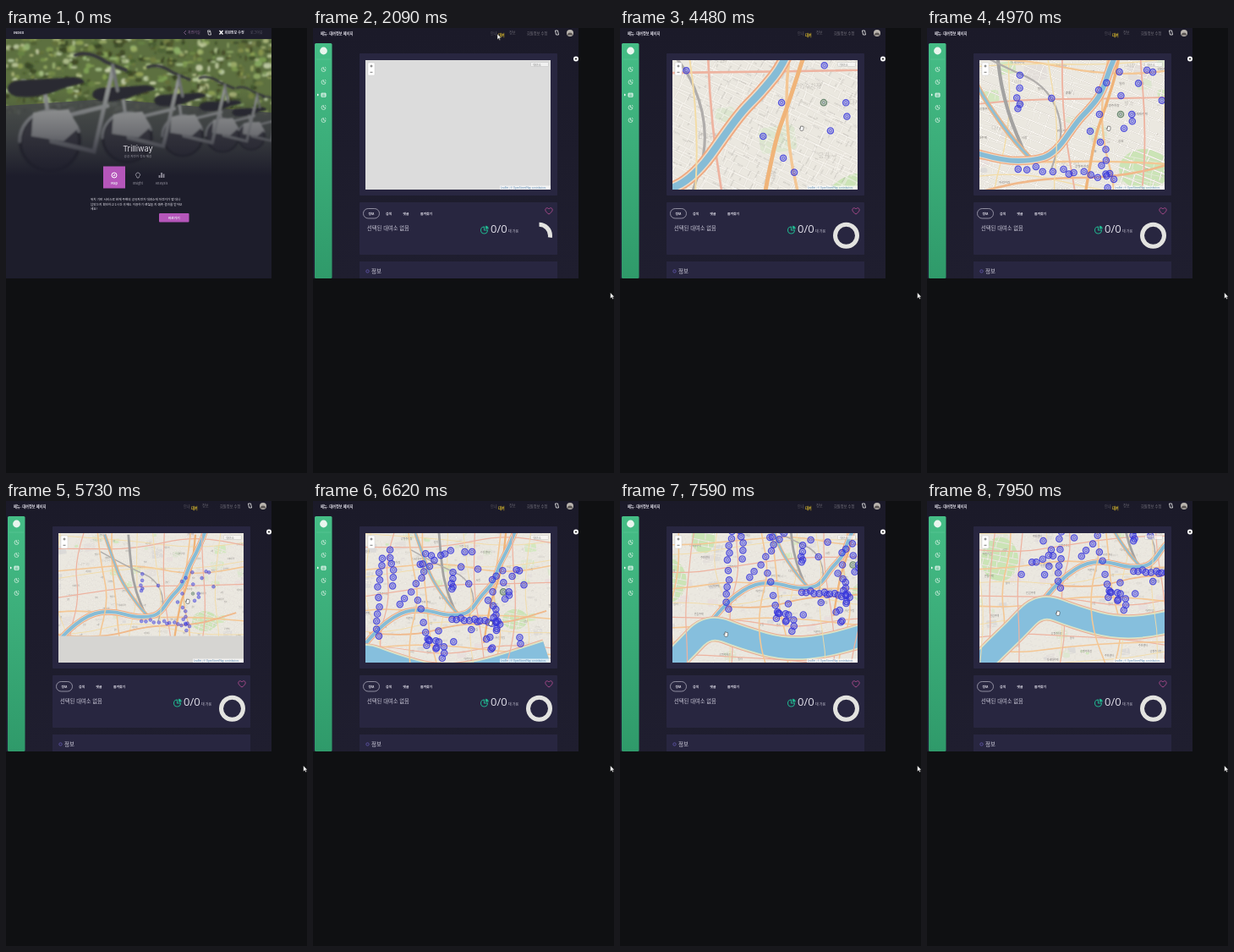
These frames come from a looping animation (356x526 px, 8000 ms). An HTML page:

```html
<!DOCTYPE html>
<html lang="ko">
<head>
<meta charset="utf-8">
<title>Bike map</title>
<style>
html,body{margin:0;width:100%;height:100%;overflow:hidden;background:#0f1012}
svg{display:block;width:356px;height:526px}
text{font-family:'Noto Sans CJK KR','Noto Sans',sans-serif;fill:#e6e4ee}
.mid{text-anchor:middle}
</style>
</head>
<body>
<svg viewBox="0 0 356 526">
  <defs>
    <linearGradient id="fade" x1="0" y1="0" x2="0" y2="1">
      <stop offset="0" stop-color="#1d1d2b" stop-opacity="0"/>
      <stop offset=".5" stop-color="#1d1d2b" stop-opacity=".4"/>
      <stop offset="1" stop-color="#1d1d2b"/>
    </linearGradient>
    <linearGradient id="side" x1="0" y1="0" x2="0" y2="1">
      <stop offset="0" stop-color="#45bd86"/><stop offset="1" stop-color="#2f9a6a"/>
    </linearGradient>
    <linearGradient id="page" x1="0" y1="0" x2="0" y2="1">
      <stop offset="0" stop-color="#1b1a29"/><stop offset="1" stop-color="#1f1e2f"/>
    </linearGradient>
    <filter id="soft"><feGaussianBlur stdDeviation=".9"/></filter>
    <clipPath id="photoClip"><rect y="13" width="314" height="162"/></clipPath>
    <clipPath id="mapClip"><rect x="62" y="38" width="219" height="153"/></clipPath>
    <path id="arrow" d="M0 0v6.6l1.6-1.4 1 2.3 1-.5-1-2.2h2z"/>
  </defs>
  <rect width="356" height="526" fill="#0f1012"/>

  <g id="landing">
    <rect width="314" height="296" fill="#1d1d2b"/>
    <g clip-path="url(#photoClip)">
      <rect y="13" width="314" height="162" fill="#5d7040"/>
      <g id="leaves" filter="url(#soft)"></g>
      <path d="M0 92L120 84 314 100V175H0z" fill="#4c4e50" opacity=".85"/>
      <g id="bikes" filter="url(#soft)"></g>
      <rect y="75" width="314" height="100" fill="url(#fade)"/>
    </g>
    <rect width="314" height="13" fill="#1d1d2b"/>
    <g font-size="4">
      <text x="9" y="7" font-weight="700">INDEX</text>
      <path d="M213 3l-2.5 2.5L213 8" fill="none" stroke="#8f6a94" stroke-width=".8"/>
      <text x="215" y="7" style="fill:#8f6a94">자전거길</text>
      <path d="M238.500 3h3l1 5h-3zM239.500 4.500h2" fill="none" stroke="#ddd" stroke-width=".8"/>
      <path d="M252.500 3l4 4.500M256.500 3l-4 4.500" stroke="#fff" stroke-width="1.300"/>
      <text x="258.500" y="7" font-weight="700">회원정보 수정</text>
      <text x="289" y="7" style="fill:#5e5c6b">로그아웃</text>
    </g>
    <text class="mid" x="156" y="146" font-size="9.200" style="font-family:Inter,sans-serif;fill:#d8d6dc">Trilliway</text>
    <text class="mid" x="156" y="152.500" font-size="3.600" style="fill:#9c9aa6">공공 자전거 정보 제공</text>
    <rect x="115" y="163.500" width="26" height="26" fill="#b556ba"/>
    <circle cx="128" cy="174" r="3" fill="none" stroke="#fff"/>
    <path d="M126.500 175.500l1-2 2-1-1 2z" fill="#fff"/>
    <g fill="none" stroke="#8d8b98">
      <path d="M154.500 175.500a2.500 2.500 0 1 1 3 0l-.5 1.500h-2z"/>
      <path d="M181.500 177v-3M184 177v-6M186.500 177v-4.500" stroke-width="1.800"/>
    </g>
    <g class="mid" font-size="3.800">
      <text x="128" y="185" font-weight="700">Map</text>
      <text x="156" y="185" style="fill:#9a98a4">Insight</text>
      <text x="184" y="185" style="fill:#9a98a4">Analysis</text>
    </g>
    <g font-size="3.650" font-weight="500">
      <text x="100" y="204.300">위치 기반 서비스로 현재 주변의 공유자전거 대여소에 자전거가 몇 대나</text>
      <text x="100" y="209.800">남았는지 확인하고 1시간 후에도 이용하기 괜찮을 지 예측 결과를 받아보</text>
      <text x="100" y="215.300">세요!</text>
    </g>
    <rect x="181" y="219" width="35.500" height="10.500" rx="1" fill="#b556ba"/>
    <text class="mid" x="198.700" y="225.700" font-size="3.800" font-weight="700">바로가기</text>
  </g>

  <g id="board">
    <rect width="314" height="296" fill="url(#page)"/>
    <g font-size="4.200">
      <text x="9" y="8" font-weight="700">메뉴. 대여정보 페이지</text>
      <text x="210" y="8" style="fill:#55535f">안내</text>
      <text x="219" y="9.500" font-weight="700" style="fill:#d9b92c">대여</text>
      <text x="232" y="7" style="fill:#66646f">정보</text>
      <text x="253" y="8" style="fill:#77757f">회원정보 수정</text>
    </g>
    <path d="M286.500 3h3l1 5h-3z" fill="none" stroke="#ddd" stroke-width=".9"/>
    <circle cx="304" cy="6" r="4" fill="#b9b4ae"/><path d="M301 8.500a3 3 0 0 1 6 0z" fill="#5a5553"/>
    <circle cx="311" cy="36.500" r="3" fill="#fff"/><circle cx="311" cy="36.500" r="1.100" fill="#222"/>
    <rect x="2" y="18" width="20.500" height="278" rx="1.500" fill="url(#side)"/>
    <circle cx="12.500" cy="27" r="4.400" fill="#e9f5ee"/>
    <path d="M4 37h17" stroke="#62c99a" stroke-width=".5"/>
    <g id="icons" fill="none" stroke="#bfe6d2" stroke-width=".9"></g>
    <path d="M5 77.500l2 1.500-2 1.500z" fill="#fff"/>
    <g fill="#282640">
      <rect x="55" y="30" width="234" height="168" rx="1"/>
      <rect x="55" y="206" width="234" height="62" rx="1"/>
      <rect x="55" y="276" width="234" height="20"/>
    </g>
    <g clip-path="url(#mapClip)">
      <rect x="62" y="38" width="219" height="153" fill="#dcdcdc"/>
      <g id="tiles">
        <rect x="62" y="38" width="219" height="153" fill="#ebe8e0"/>
        <g id="land"></g>
        <g id="details"></g>
        <g id="roads" fill="none" stroke-linejoin="round"></g>
        <rect id="gap" x="62" width="219" height="60" fill="#d6d5d2"/>
        <g id="pins"></g>
      </g>
      <g opacity=".6">
        <rect x="257.500" y="40.500" width="21" height="5" rx="1" fill="#fff" stroke="#aaa" stroke-width=".5"/>
        <text x="260" y="44.600" font-size="3.600" style="fill:#555">대여소</text>
      </g>
      <rect x="65" y="41" width="8" height="15" rx="1" fill="#fff" stroke="#ccc" stroke-width=".5"/>
      <path d="M67.500 45h3M69 43.500v3M67.500 52.300h3" stroke="#444" stroke-width=".7"/>
      <rect x="221" y="186.500" width="60" height="4.500" fill="#fff" opacity=".7"/>
      <text x="222" y="190" font-size="2.900" style="fill:#4b7fae">Leaflet | © OpenStreetMap contributors</text>
    </g>
    <rect x="59.500" y="213.500" width="19" height="11.500" rx="5.700" fill="none" stroke="#aaa8b8" stroke-width=".8"/>
    <g class="mid" font-size="3.800" font-weight="700">
      <text x="69" y="220.800">정보</text><text x="89.500" y="220.800">검색</text>
      <text x="110" y="220.800">댓글</text><text x="134" y="220.800">즐겨찾기</text>
    </g>
    <path d="M279 220c-8-5-2.500-9.500 0-6 2.500-3.500 8 1 0 6z" fill="none" stroke="#b24c90" stroke-width=".9"/>
    <text x="64" y="238.500" font-size="6.300" style="fill:#c9c7d6">선택된 대여소 없음</text>
    <path d="M202.500 235a4 4 0 1 0 4 4h-4z" fill="none" stroke="#21b08c" stroke-width="1.100"/>
    <path d="M204 237.500v-3.700a3.700 3.700 0 0 1 3.700 3.700z" fill="#21b08c"/>
    <text x="210" y="242" font-size="13" style="font-family:'Open Sans',sans-serif;fill:#dddbe6">0/0</text>
    <text x="231" y="242" font-size="4" font-weight="500" style="fill:#c9c7d6">대 가용</text>
    <circle id="donut" cx="267.500" cy="245.300" r="13" fill="none" stroke="#e3e3e0" stroke-width="5" pathLength="100" transform="rotate(-90 267.500 245.300)"/>
    <circle cx="64.500" cy="287.500" r="1.700" fill="none" stroke="#6459b0" stroke-width=".8"/>
    <text x="69" y="290" font-size="6.500" style="fill:#d5d3e0">정보</text>
  </g>
  <use id="mouse" href="#arrow" fill="#fff" stroke="#222" stroke-width=".5"/>
  <path id="hand" d="M-1.500-2.500c0-1 1.200-1 1.200 0 .2-.7 1.200-.6 1.200.2.400-.5 1.300-.3 1.200.6L1.900 1 1.300 2.300h-2.600L-2.800-.3c0-.6.800-.6 1.300.1z" fill="#fff" stroke="#222" stroke-width=".5"/>
  <use id="outer" href="#arrow" fill="#fff" stroke="#333" stroke-width=".3"/>
</svg>
<script>
const $ = id => document.getElementById(id);
const clamp = (v, a = 0, b = 1) => Math.min(b, Math.max(a, v));
const prog = (t, a, b) => clamp((t - a) / (b - a));
const mix = (a, b, p) => a + (b - a) * p;
const easeOut = p => 1 - (1 - p) ** 3;
const easeIO = p => p * p * (3 - 2 * p);
const range = n => [...Array(n).keys()];

function add(parent, tag, attrs, text) {
  const el = document.createElementNS('http://www.w3.org/2000/svg', tag);
  for (const k in attrs) el.setAttribute(k, attrs[k]);
  if (text) el.textContent = text;
  parent.appendChild(el);
  return el;
}
function rng(seed) {
  return () => (seed = (seed * 16807) % 2147483647) / 2147483647;
}

// Landing photo: sunlit leaves and a row of bikes
const rnd = rng(77);
for (let i = 0; i < 650; i++) {
  const y = 10 + rnd() * 90, light = 18 + rnd() ** 1.4 * 62;
  add($('leaves'), 'ellipse', {
    cx: rnd() * 314, cy: y, rx: 1 + rnd() * 4, ry: 1 + rnd() * 3,
    fill: `hsl(${68 + rnd() * 22} 32% ${light}%)`, opacity: .8
  });
}
function bike(x, y, k) {
  const g = add($('bikes'), 'g', { transform: `translate(${x} ${y}) scale(${k})` });
  const line = (d, stroke, w) => add(g, 'path', { d, stroke, 'stroke-width': w, fill: 'none', 'stroke-linecap': 'round' });
  add(g, 'circle', { cx: 6, cy: 62, r: 35, fill: '#3f4144', stroke: '#2a2b2e', 'stroke-width': 4 });
  line('M-30 62a36 36 0 0 1 70-12', '#8d9090', 4);
  line('M0 4L8 62 58 74 80-22M8 36L74 20', '#8f9291', 5);
  add(g, 'path', { d: 'M-14 28L28 24 40 46 22 62-16 56z', fill: '#a3a5a3' });
  line('M36-40q16-6 36 8l24 10', '#34363a', 4);
  line('M80-28l6 30', '#6f7274', 4);
  add(g, 'path', { d: 'M-44-2q2-9 26-9 26-1 52-3 14 2 12 7-20 4-36 11-24 8-44 5-12-4-10-11z', fill: '#2a2c30' });
}
for (let i = 4; i >= 0; i--) bike(46 + 330 * (1 - .72 ** i), 72 + i * 7, .82 ** i);

range(5).forEach(i => {
  const y = 49 + i * 15;
  add($('icons'), 'path', i == 2
    ? { d: `M10 ${y - 1.800}h5v4h-5zM10 ${y}h5`, stroke: '#fff' }
    : { d: `M12.500 ${y - 2.500}a2.500 2.500 0 1 0 2.500 2.500h-2.500zM14 ${y - 3}l1.500 1.500` });
});

// Map views: screen = world * s + (x, y)
const zoomAt = (v, k, cx, cy) => ({ s: v.s * k, x: cx + (v.x - cx) * k, y: cy + (v.y - cy) * k });
const wide = { s: 1, x: -38, y: 20 };
const town = zoomAt(wide, 2, 213, 117);
const block = zoomAt(town, 2, 217, 116);
const street = zoomAt(block, 2, 217, 116);
const east = { s: 1, x: 0, y: 0 };
const south = { s: 1, x: 46, y: -39 };
const moves = [
  [2770, 3050, street, block, easeOut], [4480, 4760, block, town, easeOut],
  [5510, 5770, town, wide, easeOut], [6550, 6900, wide, east, easeIO], [7380, 7900, east, south, easeIO]
];
function viewAt(t) {
  let v = street;
  for (const [a, b, from, to, ease] of moves) if (t >= a) {
    const p = ease(prog(t, a, b));
    v = { s: mix(from.s, to.s, p), x: mix(from.x, to.x, p), y: mix(from.y, to.y, p) };
  }
  return v;
}
const pinScale = (t, s) => {
  const m = moves.find(([a, b, from, to]) => from.s != to.s && t >= a && t < b + 20);
  return m ? s / m[2].s : 1;
};

// Land patches, roads and water in world units
const r = rng(41);
const tints = ['#d3e8c0', '#e4dfdb', '#dde6d0', '#e9dfdd', '#dcdad8'];
range(110).forEach(i => {
  const size = 3 + r() * 7;
  add($('land'), 'rect', {
    x: r() * 330 - 20, y: r() * 230 + 10, width: size * 1.4, height: size, rx: 1.500,
    fill: tints[i % tints.length], transform: 'rotate(-8)'
  });
});
for (const [cx, cy, rx, ry] of [[273, 122, 15, 12], [40, 108, 22, 26], [82, 58, 14, 18]])
  add($('land'), 'ellipse', { cx, cy, rx, ry, fill: '#cbe4b6' });

const curve = p => {
  let d = 'M' + p[0];
  for (let i = 1; i < p.length - 1; i++)
    d += `Q${p[i]} ${(p[i][0] + p[i + 1][0]) / 2} ${(p[i][1] + p[i + 1][1]) / 2}`;
  return d + 'L' + p[p.length - 1];
};
const roads = [];
function road(pts, ...coats) {
  for (const [stroke, w] of coats) roads.push({ w, el: add($('roads'), 'path', { d: curve(pts), stroke }) });
}
const paints = ['#f3dca6', '#eeb3a0', '#f4c795'];
function arterials(n, upright) {
  range(n).forEach(i => {
    const base = (i + .5) / n, drift = r() * 50 - 25;
    const pts = range(6).map(k => {
      const main = k / 5, side = (r() - .5) * 20 + drift * main;
      return upright ? [base * 330 - 20 + side, main * 240] : [main * 350 - 20, base * 230 + 15 + side];
    });
    road(pts, [paints[i % 3], .9 + i % 3 * .35]);
  });
}
arterials(13, false);
arterials(10, true);
road([[236, 150], [242.7, 106], [249.6, 86.8], [258, 60], [262, 20]], ['#f0b479', 2.300]);
road([[100, 138], [150, 143], [205, 127], [262, 127], [310, 112]], ['#f0b98b', 1.800]);
road([[183, 20], [186, 60], [192, 88], [202, 112]], ['#a3a2a1', 2.800]);
road([[150, 40], [186, 60], [215, 72], [226, 98], [218, 122]], ['#b0adab', 1.500]);
road([[155, 20], [168, 58], [176, 77], [194, 103], [207, 117]], ['#eab488', 4], ['#8fbfd4', 2]);
road([[84, 166], [104, 139], [137, 113], [165, 110], [190, 117], [207, 117], [220, 113], [233.6, 93.2], [240.2, 86.7], [248, 77], [254, 58], [265, 38], [276, 10]],
  ['#efa981', 7.200], ['#f1dcc6', 5.400], ['#86bcd6', 4]);
road([[-10, 262], [22, 226], [58, 192], [88, 160], [129, 176], [179, 190], [233, 185], [310, 160]],
  ['#ecab94', 30], ['#dbe3c6', 28], ['#86bfdd', 24.500]);
arterials(5, true);

// Street grids, one for each zoom level
const words = ['다세대주택', '빌라', '연립주택', '공영주차장', '주민센터', '어린이집', '시장', '공원'];
function grid({ view, level, angle, cx, cy, w, h, step, width, labels, size }) {
  const r = rng(11 + level * 18), el = add($('details'), 'g', {});
  const g = add(el, 'g', { transform: `translate(${cx} ${cy}) rotate(${angle})` });
  let d = '';
  for (let y = -h; y < h; y += step * (.8 + r() * .5)) {
    d += `M${-w} ${y}Q0 ${y + r() * step - step / 2} ${w} ${y}`;
    for (let x = -w; x < w; x += step * (1 + r() * 1.800)) d += `M${x} ${y}l${r() * 3 - 1.500} ${step * 1.050}`;
  }
  add(g, 'path', { d, fill: 'none', stroke: '#cdc7bf', 'stroke-width': width * 1.500 });
  add(g, 'path', { d, fill: 'none', stroke: '#fffdf8', 'stroke-width': width });
  const cols = Math.round(Math.sqrt(labels * 1.400)), rows = Math.ceil(labels / cols);
  range(labels).forEach(i => {
    const x = ((i % cols + r() * .7) / cols * 2 - 1) * w * .9, y = ((Math.floor(i / cols) + r() * .7) / rows * 2 - 1) * h * .9;
    const turn = level == 3 ? (r() < .5 ? -88 : 0) : -angle;
    const label = add(g, 'text', { transform: `translate(${x} ${y}) rotate(${turn})`, 'font-size': size }, words[Math.floor(r() * words.length)]);
    label.style.fill = level == 3 ? '#5b5654' : '#85807e';
  });
  return { el, view, level };
}
const grids = [
  grid({ view: east, level: 0, angle: 12, cx: 150, cy: 135, w: 200, h: 165, step: 7, width: .6, labels: 90, size: 3 }),
  grid({ view: town, level: 1, angle: 22, cx: 180, cy: 115, w: 260, h: 220, step: 10, width: 1, labels: 110, size: 3.600 }),
  grid({ view: street, level: 3, angle: 27, cx: 180, cy: 115, w: 270, h: 240, step: 17, width: 3.200, labels: 340, size: 4.100 })
];

// Bike stations strung along streets or scattered over districts
const pins = [];
function pin(x, y, from, color = '#3434dc') {
  const el = add($('pins'), 'g', {});
  add(el, 'circle', { r: 3.700, fill: color, 'fill-opacity': .3, stroke: color, 'stroke-width': 1.200, 'stroke-opacity': .8 });
  add(el, 'circle', { r: 1.500, fill: '#c9c9f2', 'fill-opacity': .5, stroke: color, 'stroke-width': .6 });
  pins.push({ x, y, from, el });
}
const inCore = (x, y) => x > 232 && x < 262 && y > 85 && y < 108;
function along(n, x0, y0, x1, y1, from = 0) {
  range(n).forEach(i => {
    const p = i / (n - 1);
    pin(mix(x0, x1, p) + r() * 5 - 2.5, mix(y0, y1, p) + r() * 5 - 2.5, from);
  });
}
function scatter(n, x0, y0, x1, y1, from = 0) {
  range(n).forEach(() => {
    const x = mix(x0, x1, r()), y = mix(y0, y1, r());
    if (!inCore(x, y)) pin(x, y, from);
  });
}
const expanded = 5910, panned = 7660;
pin(259, 89.5, 0, '#53775d');
[[246.5, 89.5], [241, 99.5], [247, 106]].forEach(p => pin(...p, 0));
along(13, 200, 122, 256, 127);
along(6, 248, 111, 252, 131);
along(3, 262, 96, 266, 90);
along(5, 197, 68, 200, 88);
scatter(9, 217, 58, 284, 84);
along(11, 114, 48, 110, 143, expanded);
along(6, 126, 42, 128, 80, expanded);
along(9, 136, 104, 185, 45, expanded);
along(5, 157, 100, 172, 147, expanded);
scatter(10, 143, 40, 235, 66, expanded);
scatter(20, 166, 132, 280, 170, expanded);
scatter(10, 64, 80, 105, 128, panned);

// Pointers
const stops = [[970, 262, 135], [1740, 217, 5], [2090, 218, 7], [2560, 234, 60], [2700, 234, 60], [3410, 241, 120], [3480, 241, 120],
  [3620, 215, 119], [5800, 215, 119], [6350, 206, 147], [6550, 206, 147], [6900, 244, 127], [7310, 109, 172],
  [7380, 109, 172], [7900, 155, 133], [8000, 155, 133]];
function pointer(t) {
  const i = Math.max(1, stops.findIndex(k => k[0] > t));
  const [a, x, y] = stops[i - 1], [b, u, v] = stops[i], p = easeIO(prog(t, a, b));
  return `translate(${mix(x, u, p)} ${mix(y, v, p)})`;
}
const show = (el, on) => el.setAttribute('display', on ? 'inline' : 'none');

function draw(t) {
  const board = t >= 1810, onMap = t >= 2400;
  show($('landing'), !board);
  show($('board'), board);
  show($('outer'), t >= 190);
  const q = easeIO(prog(t, 190, 750));
  $('outer').setAttribute('transform', `translate(${mix(259.5, 351.8, q)} ${mix(136.5, 313, q)})`);
  show($('mouse'), t >= 970 && !onMap);
  show($('hand'), onMap);
  (onMap ? $('hand') : $('mouse')).setAttribute('transform', pointer(t));
  if (!board) return;

  const v = viewAt(t), lag = Math.log2(viewAt(t - 270).s);
  const matrix = (k, x, y) => `matrix(${k} 0 0 ${k} ${x} ${y})`;
  $('tiles').setAttribute('opacity', prog(t, 2150, 2500));
  for (const id of ['land', 'roads']) $(id).setAttribute('transform', matrix(v.s, v.x, v.y));
  for (const { el, w } of roads) el.setAttribute('stroke-width', w * v.s ** -.45);
  for (const { el, view, level } of grids) {
    const k = v.s / view.s, o = clamp(1.4 - Math.abs(lag - level));
    show(el, o > 0);
    el.setAttribute('opacity', o);
    el.setAttribute('transform', matrix(k, v.x - view.x * k, v.y - view.y * k));
  }
  const k = pinScale(t, v.s);
  for (const p of pins) {
    show(p.el, t >= p.from);
    p.el.setAttribute('transform', matrix(k, p.x * v.s + v.x, p.y * v.s + v.y));
  }
  show($('gap'), t >= 5510 && t < 5980);
  $('gap').setAttribute('y', mix(191, 159.5, easeOut(prog(t, 5510, 5760))));
  $('gap').setAttribute('opacity', 1 - prog(t, 5800, 5980));
  const filled = 100 * (1 - (1 - prog(t, 2050, 2570)) ** 4);
  $('donut').setAttribute('stroke-dasharray', `${filled} 200`);
}
const start = performance.now();
function tick() {
  draw((performance.now() - start) % 8000);
  requestAnimationFrame(tick);
}
tick();
</script>
</body>
</html>
```
